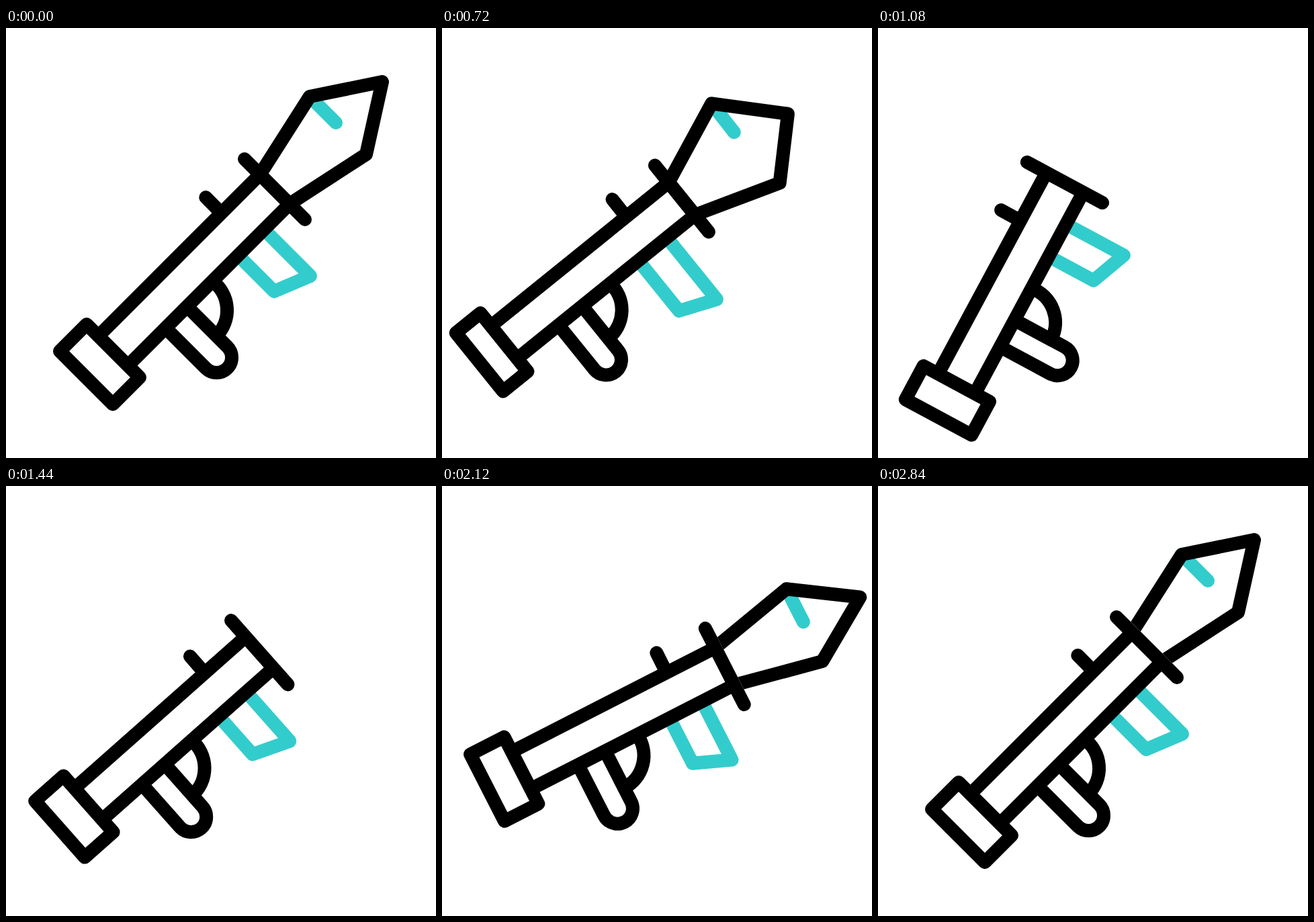
Recreate the animation shown at these times as an HTML page. Size 640 px wide and 640 px high, loop 3 s.

```html
<!DOCTYPE html>
<html lang="en">
<head>
<meta charset="utf-8">
<title>Launcher</title>
<style>
  html, body { margin: 0; width: 100%; height: 100%; overflow: hidden; background: #fff; }
  svg { display: block; width: 100%; height: 100%; }
  path { fill: none; stroke: #000; stroke-width: 20; stroke-linejoin: round; }
  .teal { stroke: #3cc; }
  .round { stroke-linecap: round; }
</style>
</head>
<body>
<svg viewBox="0 0 640 640">
  <clipPath id="muzzle"><path d="M-25.86 -200 574.14 400H900V-200Z"/></clipPath>
  <g id="gun">
    <path id="foregrip" class="teal"/>
    <path d="M307.7 377A54 54 0 0 1 313.4 458"/>
    <path d="M269.5 414.5 329.4 474.4A22.6 22.6 0 0 1 297.4 506.4L237.5 446.5"/>
    <path class="round" d="M297.3 252 320 275"/>
    <path d="M137.5 458.5 378 218M181.5 502.5 422 262"/>
    <path id="breech"/>
    <g id="port">
      <g id="rocket">
        <path id="mark" class="teal round"/>
        <path id="shell"/>
      </g>
    </g>
    <path class="round" d="M355 195 445 285"/>
  </g>
</svg>
<script>
  const LOOP = 3000, STEP = 40, AIM = 18;
  const $ = id => document.getElementById(id);
  const [gun, port, rocket, foregrip, breech, mark, shell] =
    ['gun', 'port', 'rocket', 'foregrip', 'breech', 'mark', 'shell'].map($);

  const clamp = x => Math.min(1, Math.max(0, x));
  const ease = (t, a, b) => (1 - Math.cos(Math.PI * clamp((t - a) / (b - a)))) / 2;
  const decay = (t, a, tau) => 1 - Math.exp(-Math.max(0, t - a) / tau);
  const draw = (el, pts, end = '') => el.setAttribute('d', 'M' + pts.join(' ') + end);

  // Brief deformation at the moment of firing
  const squash = t => clamp((t - 680) / 40) * (1 - ease(t, 720, 860));

  function shape(s) {
    const g = 14.5 * s, b = 6.8 * s;
    const x = 452 - 23 * s, y = 102 - 7.5 * s;
    draw(foregrip, [384, 300, 453 + g, 369 + g, 399 + g, 392 + g, 345.5, 338.5]);
    draw(breech, [120, 441, 80 + b, 481 - b, 159 + b, 560 - b, 199, 520], 'Z');
    draw(mark, [x, y, x + 39 - s, y + 39]);
    draw(shell, [378, 218, x, y, 560 - 16.3 * s, 80 + 17.7 * s,
      536 + 6.4 * s, 188 + 13.4 * s, 422, 262], 'Z');
  }

  function render(t) {
    const kick = decay(t, 680, 52.4) * (1 - ease(t, 1200, 1575));
    const swing = decay(t, 680, 97) * (1 - ease(t, 1170, 1655));
    const aim = AIM * ease(t, 40, 240) * (1 - ease(t, 2090, 2840));
    gun.setAttribute('transform',
      `translate(${-95.7 * kick} ${9.6 * kick}) rotate(${aim - 35.3 * swing} 320 320)`);

    const reload = t > 1200;
    const d = reload ? -240 * (1 - ease(t, 1600, 2040)) : 1.9 * Math.max(0, t - 720);
    const k = d * Math.SQRT1_2;
    rocket.setAttribute('transform', `translate(${k} ${-k})`);
    rocket.style.display = t > 1040 && t < 1600 ? 'none' : '';
    if (reload) port.setAttribute('clip-path', 'url(#muzzle)');
    else port.removeAttribute('clip-path');

    shape(squash(t));
  }

  function tick() {
    const t = performance.now() % LOOP;
    render(Math.floor(t / STEP) * STEP);
    requestAnimationFrame(tick);
  }
  tick();
</script>
</body>
</html>
```
